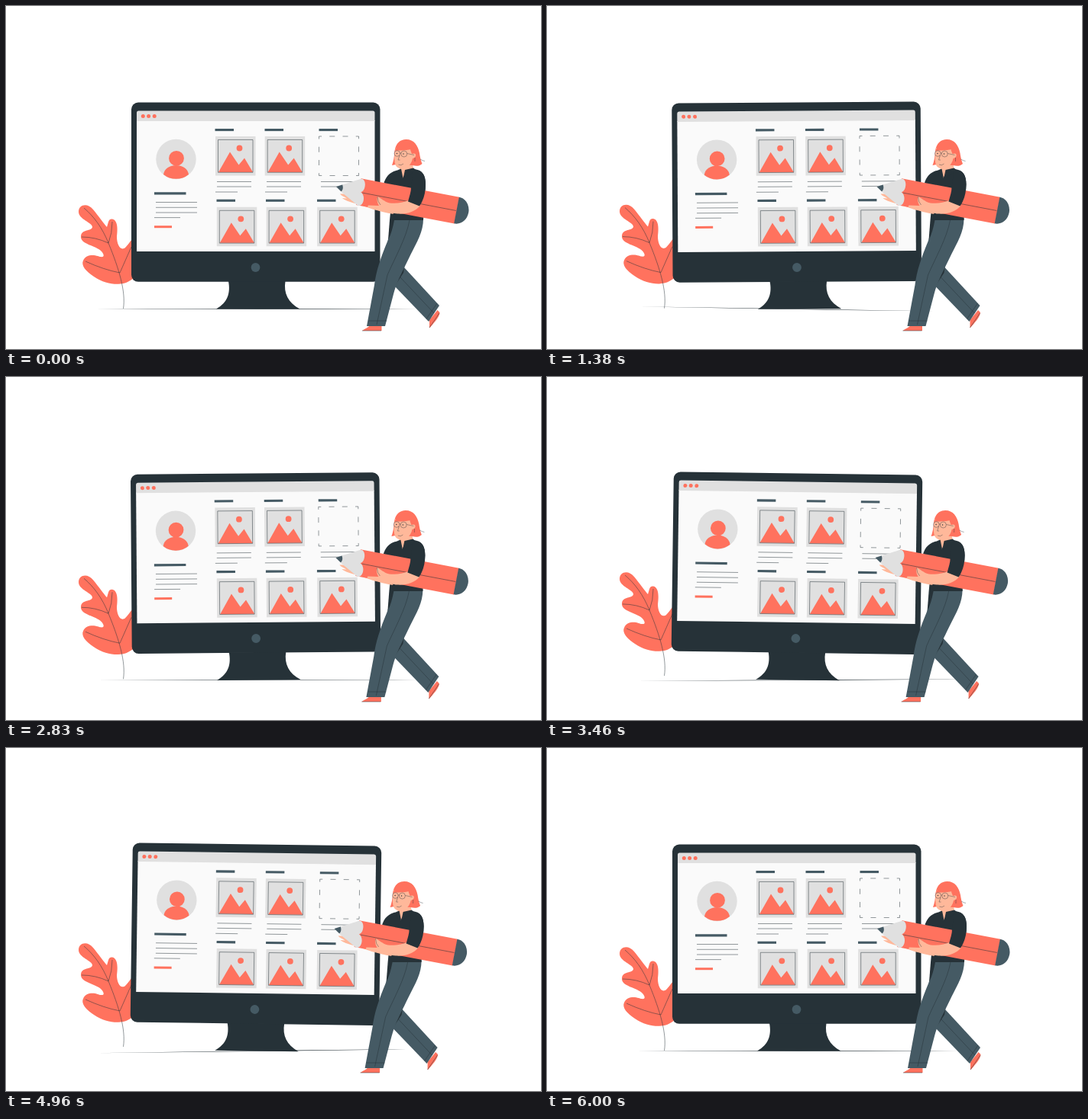
Animation, 700 px wide and 450 px high, one loop 6.04 s. Source, as an HTML page:

```html
<!DOCTYPE html>
<html lang="en">
<head>
<meta charset="utf-8">
<title>Site builder</title>
<style>
  html, body { margin: 0; width: 100%; height: 100%; overflow: hidden; background: #fff; }
  svg { display: block; width: 700px; height: 450px; }
  .coral { fill: #ff725e; }
  .dark { fill: #263238; }
  .slate { fill: #455a64; }
  .grey { fill: #e0e0e0; }
  .skin { fill: #ffb89a; }
  .thin { fill: none; stroke: #263238; stroke-width: .5; }
  .fine { stroke-width: .4; }
</style>
</head>
<body>
<svg viewBox="0 0 700 450">
  <defs>
    <g id="card">
      <path class="grey" d="M274 171h52.5v51.5H274z"/>
      <path class="coral" d="M278 218L293 191.5 304.5 208.5 312 199.5 323 218z"/>
      <circle class="coral" cx="305.5" cy="186.5" r="3.9"/>
      <path class="thin" d="M277.5 175.5h45.5v42.8h-45.5z"/>
    </g>
  </defs>

  <path id="ground" class="dark" d="M117 397.6Q328 397 540 397.6Q328 398.2 117 397.6z"/>

  <g id="plant">
    <path class="coral" d="M95 270C95 260 107 258 114 267C122 277 127 284 132 290C134 284 134 279 139 279.5C147 281 146 295 145 303C145 313 150 322 156 317C160 313 162 309 165 306H168V356C160 363 154 364.5 147 364.8C136 365 126 362.5 115 355C104 348 98 340 101 334C104 326 114 326 120 328C128 331 130 328 125 322C118 314 97 313 98 302C99 292 112 296 113 290C113 284 95 280 95 270z"/>
    <path class="thin" d="M153.5 397C157 375 148 345 134 311C126 291 115 276 102 265M134 311Q117 303 99 303M134 311Q139 298 139 283M149 350Q128 346 104 335M149 350L164 316"/>
  </g>

  <g id="monitor">
    <path class="dark" d="M291 361H365.5C363 377 369 389 384.5 397.5H275C290 389 294 377 291 361z"/>
    <rect class="dark" x="164" y="126.5" width="325.5" height="235.3" rx="9"/>
    <path fill="#fafafa" d="M171 150h311.5v172H171z"/>
    <path class="grey" d="M171 151V140Q171 137.5 173.5 137.5H480Q482.5 137.5 482.5 140V151z"/>
    <g class="coral">
      <circle cx="179.3" cy="144.5" r="2.5"/>
      <circle cx="186.6" cy="144.5" r="2.5"/>
      <circle cx="194.2" cy="144.5" r="2.5"/>
    </g>
    <circle class="slate" cx="326.5" cy="343" r="5.9"/>

    <circle class="grey" cx="222.5" cy="201" r="26.2"/>
    <circle class="coral" cx="223" cy="199.8" r="9.9"/>
    <path class="coral" d="M206 221C208 205 237 205 239 221A26.2 26.2 0 0 1 206 221z"/>
    <path class="slate" d="M194 244.3h41.5v3.1H194z"/>
    <path class="coral" d="M194 288.2h23v3h-23z"/>
    <g id="cards"></g>
    <rect class="thin" x="409.5" y="171" width="52" height="51.5" stroke-dasharray="7 10.25" stroke-dashoffset="3.5"/>
    <path id="lines" class="thin"/>
  </g>

  <g id="woman">
    <!-- back leg, front leg, shoes -->
    <path class="coral" d="M554 422.5L554 412 564.5 399 567.5 402C567 408 562 413 558.5 417.5z"/>
    <path class="slate" d="M507 366L521 343 567 393 553 414z"/>
    <path class="thin" d="M515 355L560 403M550 410.5L564 390"/>
    <path class="dark" d="M507 370L509 345 524 325 520 350z"/>
    <path class="coral" d="M466 426C470 423 474 422 476 419H491.5V426z"/>
    <path class="thin" d="M466 426H491M554 422L567 403"/>
    <path class="slate" d="M503 279H546C546 296 538 309 529 327C519 348 511 362 507 378L496 420H472L482 366C484 348 491 328 499 309C503 299 504 290 503 279z"/>
    <path class="dark" d="M502 281H508C506 291 504 299 500 307z"/>
    <path class="thin" d="M528 281C524 304 508 332 499 353L485 418M474 413H498"/>

    <!-- torso and neck -->
    <path class="dark" d="M494 234C497 222 504 217 514 215L534 214C545 215 549 222 549 234L546 281H502L505 250z"/>
    <path class="skin" d="M515 214L517 204H532L533 214.5C527 216 522 219 519 226z"/>
    <path class="dark" d="M513 215L517 213.5 519.5 226 513 222zM533 212.5L537 215.5 519.5 227 522 215z"/>

    <!-- head -->
    <path class="coral" d="M505 209C507 204 508 198 508.5 190C510 180 516 175 523.5 175C534 175 539 183 541 193C542 200 543 203 544.5 207C541 210 537 210.5 532 209L510 208z"/>
    <path class="skin" d="M510 186C507.5 194 508 202 509 207C510.5 212.5 516 214.5 521 213C527 211.5 531 206 532 200C536 200 538 194 534 193.5L531 194C530 191 529 190 529 187z"/>
    <path class="coral" d="M509 190C513 189 522 190 530 188L527 180H513z"/>
    <g class="thin fine">
      <circle cx="511.8" cy="193.5" r="3.8"/>
      <circle cx="520.8" cy="194" r="4"/>
      <path d="M515.5 193H517M524.8 193.5L534 195.5M513.5 208Q517 210 520 207M515 196L513 202H515.5M535 199V204M542 201Q545 203 548 203.5"/>
    </g>
    <circle class="dark" cx="511.5" cy="193.5" r=".7"/>
    <circle class="dark" cx="520" cy="194" r=".7"/>

    <!-- far arm, pencil, near arm -->
    <path class="skin" d="M437 246.5C444 246 451 249 457 252L500 258 507 273C488 270 472 264 461 260C452 258 443 255 440 252L446 252.5C442 250 439 249 437 246.5z"/>
    <g transform="translate(432 237) rotate(10.8)">
      <path class="coral" d="M30-16.7H161V18.6H30z"/>
      <path class="slate" d="M160.5-16.7C170-17 176.5-8 176.5 1C176.5 11 170 18.6 160.5 18.6z"/>
      <path class="grey" d="M0 0L30-16.2C38-18 39-1 33 1C41 4 40 21 32 18.8L8 5.5z"/>
      <path class="slate" d="M0 0L7.5-4C9.5-1 9.5 3 7.5 5z"/>
      <path class="thin" d="M35 1.5H160"/>
    </g>
    <path class="skin" d="M486 250C491 252 495 257 502 258.5C511 259.5 519 258 527 255L542 262C535 270 524 273.5 512 272.5C501 271.5 486 268.5 473 263.5L474 261.5 488 262C485.5 258 485 254 486 250z"/>
    <path class="dark" d="M533 216C545 214 549 222 549 234C549 246 546 255 541 262.5L526 256.5C528 249 530 244 530 238z"/>
    <path class="thin fine" d="M486 250Q486 257 490 261"/>
  </g>
</svg>
<script>
const byId = id => document.getElementById(id);
const ground = byId('ground'), plant = byId('plant'), monitor = byId('monitor'), woman = byId('woman');

const cards = [[0, 0], [64.7, 0], [1.8, 92.8], [66.6, 92.8], [133.2, 92.8]];
const titles = [[273.5, 161], [338.5, 161], [409.5, 161], [275.5, 253.7], [340, 253.7], [407, 253.7]];
byId('cards').innerHTML =
  cards.map(([x, y]) => `<use href="#card" x="${x}" y="${y}"/>`).join('') +
  titles.map(([x, y]) => `<path class="slate" d="M${x} ${y}h24.5v3.1h-24.5z"/>`).join('');

const hline = (x, y, w) => `M${x} ${y}h${w}`;
byId('lines').setAttribute('d',
  [257.5, 264.3, 271].map(y => hline(196, y, 54)).join('') + hline(194, 277.6, 34) +
  [276, 341, 412].map((x, i) =>
    hline(x, 230.5, 45) + hline(x, 237, 45) + (i < 2 ? hline(x - 2, 244, 29) : '')).join(''));

function bezier(x1, y1, x2, y2) {
  const at = (a, b, u) => 3 * a * u * (1 - u) ** 2 + 3 * b * u * u * (1 - u) + u ** 3;
  return x => {
    let lo = 0, hi = 1;
    for (let i = 0; i < 24; i++) {
      const mid = (lo + hi) / 2;
      if (at(x1, x2, mid) < x) lo = mid; else hi = mid;
    }
    return at(y1, y2, lo);
  };
}
const linear = x => x;
const ease = bezier(.25, .1, .25, 1);
const easeInOut = bezier(.42, 0, .58, 1);

// stops: [position, value] pairs over one period
function track(t, period, stops, timing) {
  const p = t % period / period;
  const i = stops.findIndex(s => s[0] > p);
  const [p0, v0] = stops[i - 1], [p1, v1] = stops[i];
  return v0 + (v1 - v0) * timing((p - p0) / (p1 - p0));
}
const sway = [[0, 0], [.25, 1], [.75, -1], [1, 0]];
const lift = [[0, 0], [.5, -7.4], [1, 0]];
const shake = [0, -1, 2, -4, 4, -4, 4, -4, 2, -1, 0].map((v, i) => [i / 10, v * .65]);

const LOOP = 6040, FPS = 24;
const start = performance.now();
function draw(now) {
  const elapsed = Math.max(0, now - start) % LOOP;
  const t = Math.floor((elapsed + 5) * FPS / 1000) * 1000 / FPS;
  const move = (el, value) => el.setAttribute('transform', value);
  move(ground, `rotate(${track(t, 6000, sway, linear)} 328 397.6)`);
  move(monitor, `rotate(${track(t, 1500, sway, linear)} 326.5 262)`);
  move(plant, `translate(0 ${track(t, 1500, lift, easeInOut)})`);
  move(woman, `translate(${track(t, 1500, shake, ease)} 0)`);
  requestAnimationFrame(draw);
}
draw(start);
</script>
</body>
</html>
```
